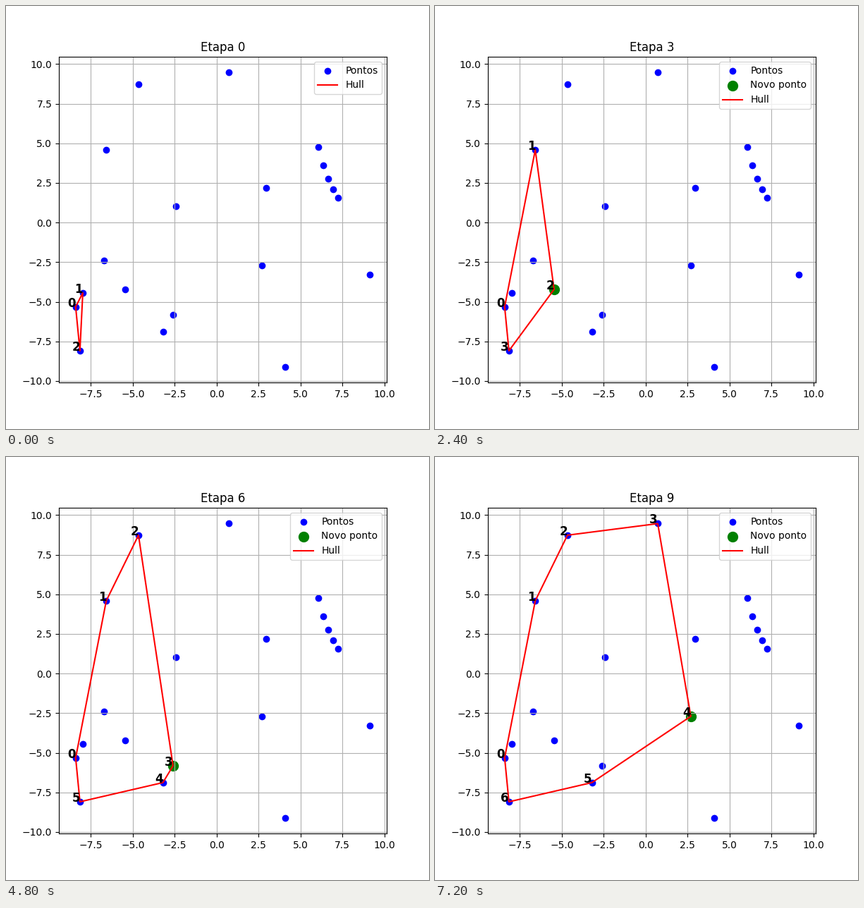
Animation of 600 by 600 pixels, one loop 8000 ms. Source, as a matplotlib script:

```python
import matplotlib.pyplot as plt
from matplotlib.animation import FuncAnimation

SPREAD = [
    (-8.405, -5.32), (-8.15, -8.09), (-7.98, -4.44), (-6.73, -2.39),
    (-6.58, 4.59), (-5.46, -4.22), (-4.66, 8.73), (-3.205, -6.88),
    (-2.6, -5.82), (-2.43, 1.03), (0.72, 9.46), (2.69, -2.7),
    (2.94, 2.19), (4.08, -9.09), (9.135, -3.28),
]
# A short run of points that falls off by a steady ratio.
RUN = [(6.05 + 0.3 * i, 4.75 * 0.76 ** i) for i in range(5)]
POINTS = sorted(SPREAD + RUN)
XS, YS = zip(*POINTS)
START = 3   # points in the first hull
STEPS = 10


def cross(o, a, b):
    return (a[0] - o[0]) * (b[1] - o[1]) - (a[1] - o[1]) * (b[0] - o[0])


def chain(points):
    """Half hull that only turns clockwise."""
    out = []
    for p in points:
        while len(out) > 1 and cross(out[-2], out[-1], p) >= 0:
            out.pop()
        out.append(p)
    return out


def convex_hull(points):
    """Clockwise hull starting at the leftmost point."""
    return chain(points)[:-1] + chain(points[::-1])[:-1]


fig, ax = plt.subplots(figsize=(6, 6), dpi=100)


def draw(step):
    ax.clear()
    ax.set_xlim(min(XS) - 1, max(XS) + 1)
    ax.set_ylim(min(YS) - 1, max(YS) + 1)
    ax.grid(True)
    ax.set_title(f"Etapa {step}")

    seen = POINTS[:START + step]
    ax.scatter(XS, YS, color="blue", label="Pontos")
    if step > 0:
        ax.scatter(*seen[-1], color="green", s=100, label="Novo ponto")

    hull = convex_hull(seen)
    ax.plot(*zip(*hull, hull[0]), color="red", label="Hull")
    for i, (x, y) in enumerate(hull):
        ax.text(x, y, str(i), fontsize=12, fontweight="bold", ha="right")
    ax.legend(loc="upper right")


anim = FuncAnimation(fig, draw, frames=STEPS, init_func=lambda: None,
                     interval=800, repeat=True, repeat_delay=0)
plt.show()
```
